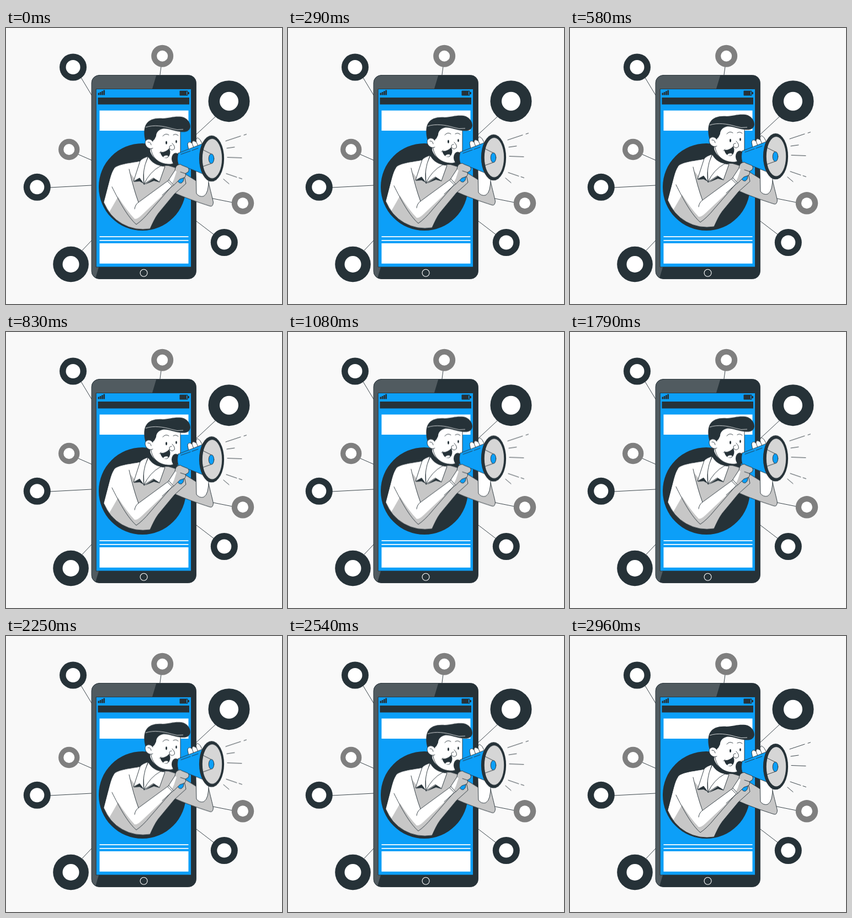
An HTML page that plays this animation: 500 px wide and 500 px high, repeating every 3 s.

```html
<!DOCTYPE html>
<html lang="en">
<head>
<meta charset="utf-8">
<title>Megaphone announcement</title>
<style>
  html, body { margin: 0; width: 100%; height: 100%; overflow: hidden; background: #f9f9f9; }
  svg { display: block; width: 100vw; height: 100vh; }
  .ink { fill: #263238; }
  .blue { fill: #0c9ff8; }
  .grey { fill: #c7c7c7; }
  .pale { fill: #d6d6d6; }
  .white { fill: #fff; }
  .none { fill: none; }
  .edge { stroke: #263238; stroke-width: .9; stroke-linecap: round; stroke-linejoin: round; }
</style>
</head>
<body>
<svg viewBox="0 0 500 500">
  <defs>
    <clipPath id="case"><rect x="155" y="85.5" width="189.5" height="369" rx="14"/></clipPath>
  </defs>

  <g id="badges"></g>

  <g id="phone">
    <rect class="ink" x="155" y="85.5" width="189.5" height="369" rx="14"/>
    <path d="M150 80H274L161.500 455H150Z" fill="#515b60" clip-path="url(#case)"/>
    <rect class="none edge" x="155" y="85.5" width="189.5" height="369" rx="14"/>
    <rect class="blue edge" x="163.5" y="110.5" width="172" height="322.5"/>
    <path class="ink" d="M166.500 117.500h2.700v4h-2.700zM169.800 116h2.700v5.500h-2.700zM173.100 114.300h2.700v7.200h-2.700zM176.400 112.500h2.700v9h-2.700z"/>
    <rect class="ink" x="314.5" y="113.5" width="15" height="9" rx="1"/>
    <path class="ink" d="M329 116h3v4h-3z"/>
    <path class="blue" d="M327 115h1.200v6h-1.200z"/>
    <rect class="ink" x="166.5" y="126" width="165.5" height="12.5"/>
    <rect class="white" x="169.5" y="149.5" width="161" height="36.5"/>
    <path class="white" d="M169.500 377.200h161v1.700h-161zM169.500 384h161v1.700h-161zM169.500 390h161v36.700h-161z"/>
    <circle class="none" cx="249.6" cy="443.8" r="6.5" stroke="#fff" stroke-width="1.1"/>
    <circle class="ink" cx="247" cy="288" r="79"/>
  </g>

  <g id="man"><g transform="translate(0 1)">
    <!-- far arm -->
    <path class="grey edge" d="M300 250L322 262L346 277L367 279C370 293 374 307 375.500 315Q375 323 370 322C348 315 322 306 303 297Z"/>
    <path class="white edge" d="M344 258L345 299Q350 306 358 304Q368 299 367 270L360 250Z"/>

    <!-- shirt -->
    <path class="grey edge" d="M244 240C226 244 204 245 196 253Q191 261 188 273L177 315A76 76 0 0 0 261 363C266 352 270 343 276 335L305 300L326 281L322 262Q308 249 284 247Z"/>
    <path class="white" d="M244 240.500C226 244.500 204 245.500 196.500 253.500Q191.500 261 188.500 273L177.500 315L187.500 332L203 305Q218 329 233 345Q238 346 246 338L303 284L296 274L240 315C234 300 229 280 225 262L233 272Z"/>
    <path class="none edge" d="M192 287C205 313 220 341 236 355Q248 347 261 331L300 286M223 255Q231 291 240 315L296 274M240 315Q234 319 233 327M283 302L303 284"/>

    <!-- neck and collar -->
    <path class="white edge" d="M261 216Q261 228 257 234L249 252L250 283L284 249L288 240Z"/>
    <path class="ink" d="M231 278L243 270L251 282L242 277ZM251 283L269 271L279 279L268 276Z"/>
    <path class="white edge" d="M257 232Q247 235 243 240L231 277L242 271L250 282Q247 266 252 247Z"/>
    <path class="white edge" d="M280 249L288 250L278 278L267 271L250 282Q260 260 280 249Z"/>
    <path class="ink" d="M260 218C263 234 276 244 301 246Q292 250 282 249C270 248 260 239 257 231Z"/>

    <!-- head -->
    <path class="white edge" d="M264 198L280 178L316 186V222Q315 243 299 246C280 247 266 237 263 220Z"/>
    <path class="ink" d="M253 205C250 196 249 183 253 175C259 164 271 162 284 163C297 162 305 158.500 318 160C329 162 334 171 334 178C333 186 326 189 315 187C303 186 293 180 283 182C275 184 272 190 272 195L269 201L264 206Z"/>
    <path d="M253 179C268 174 286 177 299 181Q310 185 321 183" fill="none" stroke="#fff" stroke-width=".8"/>
    <path class="white edge" d="M266 205C262 198 252 200 252 207C252.500 215 260 220 266 217"/>
    <path class="none edge" d="M257 206Q262 205 263 211"/>
    <path class="none edge" d="M284 195Q289 189 295 193M303 193Q308 190 312 194"/>
    <ellipse class="ink" cx="290.5" cy="207" rx="1.5" ry="3"/>
    <ellipse class="ink" cx="308.5" cy="205" rx="1.4" ry="2.8"/>
    <path class="white edge" d="M301 208Q307 214 305 218C302 222 296 220 296 215Q296 212 300 212"/>
    <path class="ink" d="M279 224Q289 225 296 217Q300 229 293 234Q284 238 279 224Z"/>
    <path class="white" d="M284.500 233Q288 229 293 230.500L294 232Q289 236.500 284.500 233Z"/>
    <path class="none edge" d="M278 225.500L281 222.500"/>

    <!-- far hand -->
    <path class="white edge" d="M331 220L329 210Q330 205 334 206L337 208Q337 203 341 204L345 206Q343 200 347 198Q352 200 355 208L358 218Z"/>
    <path class="none edge" d="M337 208L340 216M345 206L348 213"/>

    <!-- megaphone -->
    <path class="blue edge" d="M312 262L311 276Q313 281 318 280L321 277L324 262Z"/>
    <ellipse class="ink" cx="307.5" cy="236" rx="7.5" ry="10.5"/>
    <path class="blue edge" d="M312 226L358 208V264L312 246Q309 236 312 226Z"/>
    <path class="none edge" d="M317 228L334 222M337 221L348 217"/>
    <ellipse class="ink" cx="372.5" cy="235.7" rx="22.6" ry="41.6"/>
    <ellipse class="pale" cx="373.5" cy="235.7" rx="17.7" ry="35.8"/>
    <path class="none edge" d="M357 220L371 227M357 250L371 245"/>
    <ellipse class="blue edge" cx="372" cy="236" rx="4.8" ry="8.8"/>

    <!-- near hand -->
    <path class="grey edge" d="M295 274L306 257Q307 249 312 247Q316 245 319 248L329 252Q333 255 330 260L325 263Q327 269 321 271L315 273L304 284Z"/>
    <path class="white" d="M295.600 274L306.500 257.500L309 259L304 274L301 280Z"/>
    <path class="none edge" d="M316 260L325 263M293 277L302 286"/>

    <!-- sound -->
    <path class="none edge" d="M398 204L425 195M431 193.200L435.500 191.800M400 217L414 215M401 233.500L427 234.500M399 263L418 269.500M422 270.700L427.500 272.500M394 273L404 281.500"/>
  </g></g>
</svg>
<script>
  const INK = '#263238', GREY = '#7f7f7f';
  const make = (parent, tag, attrs) => {
    const el = document.createElementNS('http://www.w3.org/2000/svg', tag);
    for (const key in attrs) el.setAttribute(key, attrs[key]);
    parent.append(el);
  };

  // centre, radius, dot radius, connecting line, fill
  const badges = [
    [121.5, 71, 24.5, 13, [136, 90, 155, 121.5], INK],
    [283.2, 50.7, 20, 10, [281, 70, 279, 85], GREY],
    [404, 132.7, 37.5, 17, [380, 160, 345, 192.5], INK],
    [114.2, 220, 19.2, 10, [131, 229, 155, 239.5], GREY],
    [56.3, 288.3, 24.5, 13, [80, 289, 155, 285], INK],
    [117.5, 428, 32.3, 15, [137, 404, 155, 385], INK],
    [429, 317.3, 20.2, 10, [410, 316, 345, 303], GREY],
    [395.3, 388.5, 24.5, 13, [377, 374.5, 345, 350], INK]
  ];
  const layer = document.getElementById('badges');
  for (const [cx, cy, r, dot, [x1, y1, x2, y2], fill] of badges) {
    make(layer, 'line', { x1, y1, x2, y2, class: 'edge' });
    make(layer, 'circle', { cx, cy, r, fill });
    make(layer, 'circle', { cx, cy, r: dot, fill: '#fff' });
  }

  // linear float, 10 px up and back, in 24 steps per second, one step ahead
  const at = y => ({ transform: `translateY(${y}px)`, easing: 'steps(36)' });
  document.getElementById('man').animate([at(0), at(-10), at(0)], {
    duration: 3000, iterations: Infinity, delay: -46
  });
</script>
</body>
</html>
```
